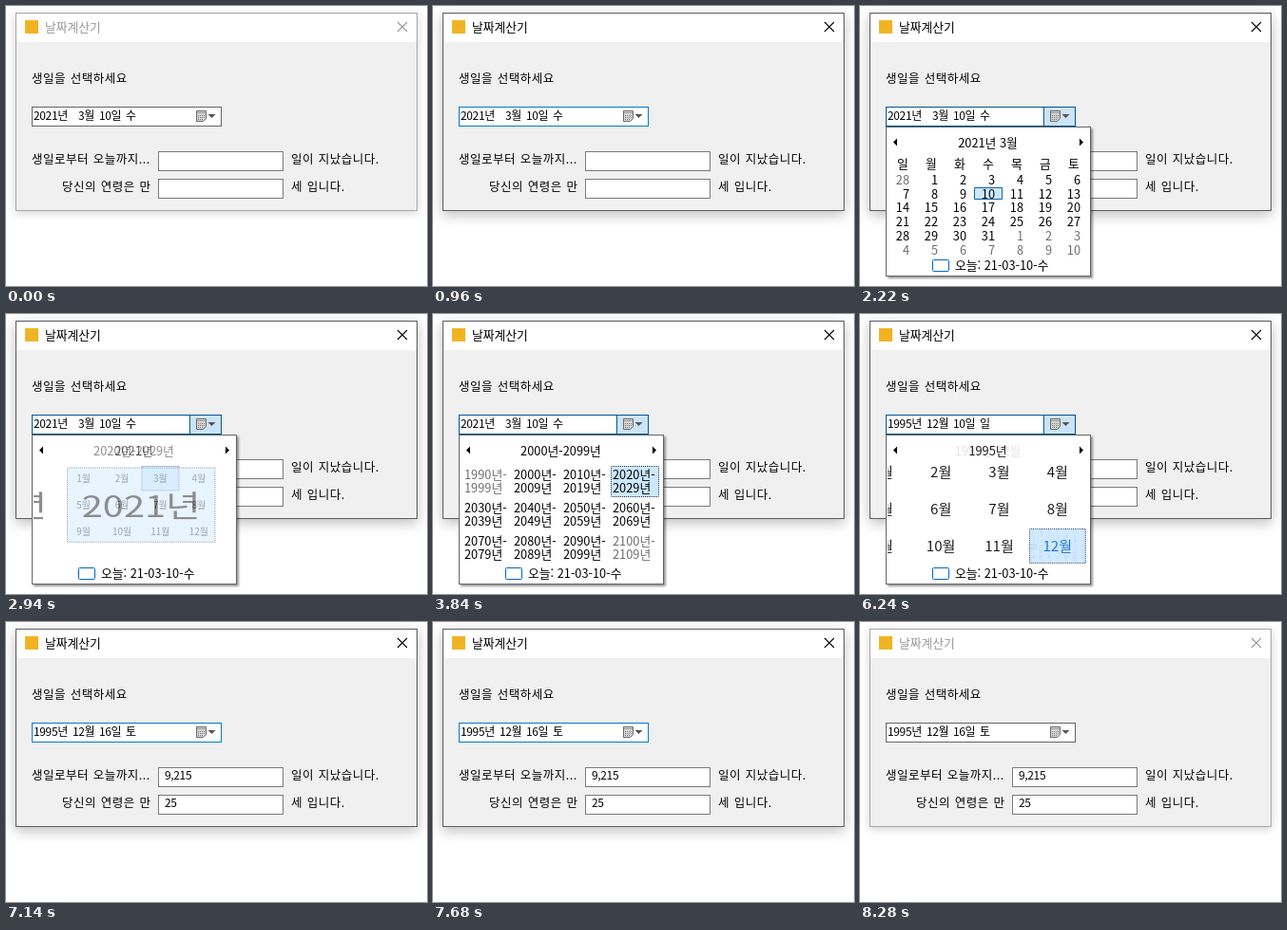
An HTML page for the animation above (8340 ms loop, 443x295 px).

```html
<!DOCTYPE html>
<html lang="ko">
<head>
<meta charset="utf-8">
<title>날짜계산기</title>
<style>
  html, body { margin: 0; width: 100%; height: 100%; overflow: hidden; background: #fff; }
  svg { display: block; width: 443px; height: 295px; }
  text { font: 350 12.8px 'Noto Sans CJK KR', 'Noto Sans CJK', 'Noto Sans KR', sans-serif; fill: #000; }
  .mid { text-anchor: middle; }
  .end { text-anchor: end; }
  .label, .value { font-weight: 400; }
  .label { font-size: 12.5px; letter-spacing: .5px; word-spacing: .7px; }
  .value { font-size: 12px; letter-spacing: -.35px; }

  .frame { fill: #f0f0f0; stroke: #a8a8a8; filter: drop-shadow(0 2px 5px rgba(0, 0, 0, .18)); }
  .caption { fill: #999; }
  .close { stroke: #999; stroke-width: 1.1; }
  .active .frame { stroke: #5c5c5c; filter: drop-shadow(0 4px 7px rgba(0, 0, 0, .26)); }
  .active .caption { fill: #000; }
  .active .close { stroke: #000; }

  .box { fill: #fff; stroke: #7a7a7a; }
  .picker { fill: #fff; stroke: #646464; }
  .hot .picker { stroke: #171717; }
  .active .picker { stroke: #0078d7; }
  .button { fill: none; stroke: none; }
  .over .button { fill: #e5f1fb; stroke: #0078d7; }
  .open .button { fill: #cce4f7; stroke: #005499; }
  .open .picker { stroke: #005499; }

  .popup { display: none; }
  .open .popup { display: inline; }
  .sheet { fill: #fff; stroke: #646464; filter: drop-shadow(2px 2px 1px rgba(0, 0, 0, .4)); }
  .lit .title { fill: #0066cc; }

  .cell rect { fill: none; stroke: none; vector-effect: non-scaling-stroke; }
  .dim text { fill: #6d6d6d; }
  .hover rect { fill: #e5f3ff; }
  .hover text { fill: #0066cc; }
  .sel rect { fill: #cce8ff; stroke: #0a64ad; }
  .sel.wide rect { stroke: #102a48; stroke-dasharray: 1 1; stroke-dashoffset: .5; }
</style>
</head>
<body>
<svg viewBox="0 0 443 295" id="stage">
  <clipPath id="area"><rect x="29" y="153" width="212" height="112"/></clipPath>

  <rect class="frame" x="10.5" y="7.5" width="422" height="208"/>
  <rect x="11" y="8" width="421" height="30" fill="#fff"/>
  <rect x="20" y="15" width="14" height="14" fill="#f0b323"/>
  <text class="caption" x="41" y="26.7">날짜계산기</text>
  <path class="close" d="M412 17l10 10M422 17l-10 10"/>

  <text class="label" x="27" y="81">생일을 선택하세요</text>
  <text class="label" x="27" y="166">생일로부터 오늘까지...</text>
  <text class="label" x="59" y="195">당신의 연령은 만</text>
  <text class="label" x="300" y="166">일이 지났습니다.</text>
  <text class="label" x="300" y="195">세 입니다.</text>

  <rect class="box" x="160.5" y="153.5" width="131" height="20"/>
  <rect class="box" x="160.5" y="182.5" width="131" height="20"/>
  <g id="results">
    <text class="value" x="167" y="166">9,215</text>
    <text class="value" x="167" y="195">25</text>
  </g>

  <rect class="picker" x="27.5" y="106.5" width="199" height="20"/>
  <rect class="button" x="193.5" y="106.5" width="33" height="20"/>
  <g id="date"></g>
  <path d="M200.5 110.5h10v8l-3 3h-7z" fill="#d6d6d6" stroke="#6a6a6a"/>
  <path d="M201 112.5h9" stroke="#999"/>
  <path d="M202 115.5h7M202 117.5h7M202 119.5h5" stroke="#777" stroke-dasharray="1 1"/>
  <path d="M212.5 114h8l-4 4z" fill="#555"/>

  <g class="popup" id="popup">
    <rect class="sheet" x="27.5" y="127.5" width="215" height="157"/>
    <path d="M39 139.5v8l-4 -4zM231 139.5v8l4 -4z"/>
    <g id="titles"></g>
    <g id="grids" clip-path="url(#area)"></g>
    <rect x="76.5" y="267.5" width="17" height="12" rx="1" fill="#fff" stroke="#0066cc"/>
    <text x="100" y="278">오늘: 21-03-10-수</text>
  </g>
</svg>
<script>
const LOOP = 8340, TICK = 60;
const DAYS = [...'일월화수목금토'];
const FULL = [30.5, 159.5, 208, 104];
const $ = id => document.getElementById(id);
const stage = $('stage');

function add(parent, tag, attrs = {}, text = '') {
  const el = document.createElementNS('http://www.w3.org/2000/svg', tag);
  for (const key in attrs) el.setAttribute(key, attrs[key]);
  el.textContent = text;
  return parent.appendChild(el);
}

const label = (parent, x, mid, text, cls = '') =>
  add(parent, 'text', { x, y: mid + 4.6, class: cls }, text);

const bigCell = i => [30.5 + 52 * (i % 4), 159.5 + 35 * Math.floor(i / 4), 52, 34];

function makeView(title, sel) {
  return {
    title: label($('titles'), 134.5, 144, title, 'title mid'),
    grid: add($('grids'), 'g'),
    cells: [],
    sel
  };
}

function addCell(view, [x, y, width, height], cls) {
  const cell = add(view.grid, 'g', { class: 'cell ' + cls });
  add(cell, 'rect', { x, y, width, height });
  view.cells.push(cell);
  return cell;
}

function monthView(year, month, day) {
  const first = new Date(year, month, 1).getDay();
  const view = makeView(`${year}년 ${month + 1}월`, first + day - 1);
  DAYS.forEach((d, c) => label(view.grid, 45 + 30 * c, 166, d, 'mid'));
  for (let i = 0; i < 42; i++) {
    const date = new Date(year, month, 1 - first + i);
    const x = 30.5 + 30 * (i % 7), mid = 183 + 14.9 * Math.floor(i / 7);
    const cell = addCell(view, [x, Math.round(mid) - 6.5, 29, 12],
      date.getMonth() === month ? '' : 'dim');
    label(cell, x + 21.5, mid, date.getDate(), 'end');
  }
  return view;
}

// Twelve large cells; name(i) gives one centred line or two left-aligned ones
function wideView(title, sel, name, isDim) {
  const view = makeView(title, sel);
  for (let i = 0; i < 12; i++) {
    const [x, y, w, h] = bigCell(i), lines = name(i);
    const cell = addCell(view, [x + 1, y + 1, w - 2, h - 2], isDim(i) ? 'wide dim' : 'wide');
    if (lines.length === 1) label(cell, x + w / 2, y + 17.5, lines[0], 'mid');
    else lines.forEach((s, k) => label(cell, x + 2.5, y + 10 + 14 * k, s));
  }
  return view;
}

const atEnds = i => i === 0 || i === 11;
const yearView = (year, month) =>
  wideView(`${year}년`, month, i => [`${i + 1}월`], () => false);
const decadeView = (start, year) =>
  wideView(`${start}년-${start + 9}년`, year - start + 1, i => [`${start - 1 + i}년`], atEnds);
const centuryView = (start, decade) =>
  wideView(`${start}년-${start + 99}년`, (decade - start) / 10 + 1, i => {
    const from = start - 10 + 10 * i;
    return [`${from}년-`, `${from + 9}년`];
  }, atEnds);

const views = [
  monthView(2021, 2, 10), yearView(2021, 2), decadeView(2020, 2021), centuryView(2000, 2020),
  decadeView(1990, 1991), yearView(1995, 2), monthView(1995, 11, 10)
];

// Zoom i leads from view i to view i + 1 through one cell
const zooms = [
  { start: 2220, end: 2520, cell: 2 },
  { start: 2760, end: 3060, cell: 2 },
  { start: 3540, end: 3840, cell: 3 },
  { start: 4500, end: 4800, cell: 0, inward: true },
  { start: 5340, end: 5640, cell: 6, inward: true },
  { start: 6120, end: 6480, cell: 11, inward: true }
];

// time, view, cell
const hovers = [
  [0, 0, -1], [4260, 3, 1], [4320, 3, 0], [4800, 4, 0], [4980, 4, 5], [5100, 4, 6],
  [5640, 5, 6], [5940, 5, 11], [6480, 6, 34], [6840, 6, 20]
];

// time, year, month, day
const dates = [
  [0, 2021, 2, 10], [4500, 1991, 2, 10], [5340, 1995, 2, 10], [6120, 1995, 11, 10], [7080, 1995, 11, 16]
];

const clamp = v => Math.min(1, Math.max(0, v));
const latest = (list, t) => list.filter(item => item[0] <= t).pop();
const dateWords = [29, 70, 98, 126].map(x => add($('date'), 'text', { x, y: 120, class: 'value' }));

function fit(view, from, to) {
  const sx = to[2] / from[2], sy = to[3] / from[3];
  view.grid.setAttribute('transform',
    `matrix(${sx} 0 0 ${sy} ${to[0] - from[0] * sx} ${to[1] - from[1] * sy})`);
}

function fade(view, opacity) {
  for (const el of [view.title, view.grid]) {
    el.style.display = opacity > 0 ? '' : 'none';
    el.style.opacity = opacity;
  }
}

function drawCalendar(t) {
  const done = zooms.filter(z => z.start <= t).length;
  const zoom = zooms[done - 1];
  const p = zoom ? clamp((t - zoom.start - TICK) / (zoom.end - zoom.start - TICK)) : 1;
  const mix = clamp((p - .1) / .9);

  views.forEach((view, i) => {
    fade(view, i === done ? (zoom ? mix : 1) : i === done - 1 ? 1 - mix : 0);
    fit(view, FULL, FULL);
  });
  if (zoom && p < 1) {
    const cell = bigCell(zoom.cell), eased = p ** 1.75;
    const grow = zoom.inward ? eased : 1 - eased;
    const now = cell.map((v, k) => v + (FULL[k] - v) * grow);
    const [outer, inner] = zoom.inward ? [done - 1, done] : [done, done - 1];
    fit(views[outer], cell, now);
    fit(views[inner], FULL, now);
  }

  const [, hoverView, hoverCell] = latest(hovers, t);
  views.forEach((view, v) => {
    const next = zooms[v];
    let sel = next && next.inward && t >= next.start ? next.cell : view.sel;
    if (v === 6 && t >= 7080) sel = 20;
    view.cells.forEach((cell, i) => {
      cell.classList.toggle('sel', i === sel);
      cell.classList.toggle('hover', v === hoverView && i === hoverCell);
    });
  });
}

function drawDate(t) {
  const [, y, m, d] = latest(dates, t);
  const words = [`${y}년`, `${m + 1}월`, `${d}일`, DAYS[new Date(y, m, d).getDay()]];
  dateWords.forEach((el, i) => el.textContent = words[i]);
  dateWords[1].setAttribute('x', m < 9 ? 76 : 70);
}

function render(t) {
  const during = (name, from, to) => stage.classList.toggle(name, t >= from && t < to);
  during('hot', 540, 960);
  during('active', 960, 8280);
  during('over', 1380, 1620);
  during('lit', 1860, 2220);
  const open = during('open', 1620, 7140);
  $('popup').style.opacity = t < 1680 ? .5 : 1;
  $('results').style.display = t >= 7140 ? '' : 'none';
  drawDate(t);
  if (open) drawCalendar(t);
}

let shown = -1;
function tick() {
  const t = Math.floor(performance.now() % LOOP / TICK) * TICK;
  if (t !== shown) render(shown = t);
  requestAnimationFrame(tick);
}
tick();
</script>
</body>
</html>
```
